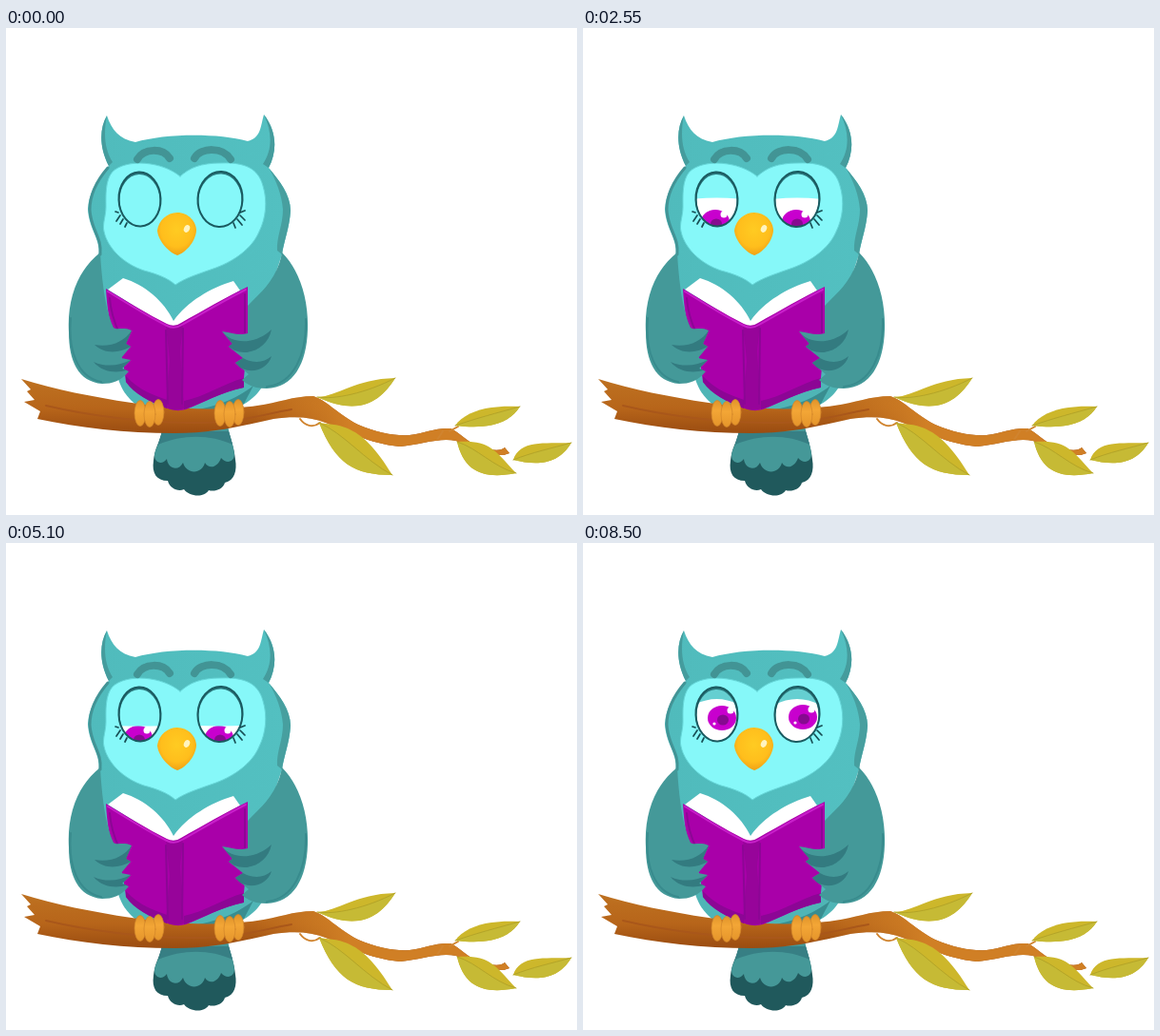
An HTML page that plays this animation: 600 by 512 pixels, repeating every 9.35 s.

```html
<!DOCTYPE html>
<html lang="en">
<head>
<meta charset="utf-8">
<title>Owl reading on a branch</title>
<style>
html, body { margin: 0; width: 100%; height: 100%; overflow: hidden; background: #fff; }
svg { display: block; width: 600px; height: 512px; }
</style>
</head>
<body>
<svg viewBox="0 0 600 512" fill="none" stroke-linecap="round" stroke-linejoin="round">
  <defs>
    <linearGradient id="coat" x1="86" x2="299" y1="0" y2="0" gradientUnits="userSpaceOnUse">
      <stop offset="0" stop-color="#50bbbc"/><stop offset="1" stop-color="#53c0c1"/>
    </linearGradient>
    <linearGradient id="wood" x1="0" x2="0" y1="372" y2="428" gradientUnits="userSpaceOnUse">
      <stop offset="0" stop-color="#bd7020"/><stop offset=".5" stop-color="#b7651a"/><stop offset="1" stop-color="#984a10"/>
    </linearGradient>
    <linearGradient id="twig" x1="260" x2="360" y1="0" y2="0" gradientUnits="userSpaceOnUse">
      <stop offset="0" stop-color="#d07f25" stop-opacity="0"/><stop offset="1" stop-color="#d07f25"/>
    </linearGradient>
    <radialGradient id="gold" cx=".5" cy=".4" r=".62">
      <stop offset="0" stop-color="#ffcb22"/><stop offset=".65" stop-color="#ffbe1c"/><stop offset="1" stop-color="#ee9e14"/>
    </radialGradient>
    <linearGradient id="toe" x1="0" x2="0" y1="0" y2="1">
      <stop offset="0" stop-color="#e0942a"/><stop offset=".4" stop-color="#f3a636"/><stop offset="1" stop-color="#e5952b"/>
    </linearGradient>
  </defs>

  <!-- tail -->
  <path fill="#20595c" d="M164 424C161 436 156 443 155 455C153 468 158 476 170 476C172 484 181 488 187 485C192 492 207 495 213 486C219 488 228 485 230 478C240 476 243 465 241 454C240 442 236 432 233 420Z"/>
  <path fill="#459898" d="M164 424C161 438 157 442 156 449C156 457 164 460 169 453C170 463 181 467 186 457C190 470 206 469 209 457C214 465 223 461 226 452C232 459 240 456 240 448C239 438 236 432 233 420Z"/>
  <path fill="#377f84" d="M164 424H234L238 438C215 427 185 427 160 438Z"/>

  <!-- lower body -->
  <path fill="#4fb5b6" d="M116 360C119 380 130 395 152 405H228C252 397 264 388 272 372V300H116Z"/>
  <path fill="#398d90" d="M178 404C215 402 243 390 260 376L250 395L228 405Z"/>

  <!-- branch -->
  <path id="bough" fill="url(#wood)" d="M16 369C52 380 91 388 132 394C180 402 230 402 264 397C286 394 302 387 323 387C336 391 349 406 370 417C391 426 409 429 424 428C440 426 452 420 467 421C478 426 485 436 499 441C511 444 520 445 524 441L529 447L523 449C506 449 490 442 473 434C456 430 435 438 414 440C381 437 360 424 336 415C321 409 303 408 281 411C252 417 222 426 177 426C125 426 77 420 33 411L36 403L19 393L30 391L22 382L26 380Z"/>
  <use href="#bough" style="fill:url(#twig)"/>
  <path fill="url(#twig)" d="M16 369C52 380 91 388 132 394C180 402 230 402 264 397C286 394 302 387 323 387C336 391 349 406 370 417C391 426 409 429 424 428C440 426 452 420 467 421C478 426 485 436 499 441C511 444 520 445 524 441L529 447L523 449C506 449 490 442 473 434C456 430 435 438 414 440C381 437 360 424 336 415C321 409 303 408 281 411C252 417 222 426 177 426C125 426 77 420 33 411L36 403L19 393L30 391L22 382L26 380Z"/>
  <path stroke="#a9571a" stroke-width="2" d="M42 397C85 407 135 414 190 415S265 407 300 401"/>
  <path stroke="#d0842f" stroke-width="2" d="M309 411C314 418 322 421 330 415M459 424L453 433M466 424L475 419"/>
  <g id="leaves"></g>

  <!-- head and upper body -->
  <path fill="url(#coat)" d="M106 92C98 106 98 126 108 145C96 158 87 174 86 190C87 213 101 222 97 242L100 330H260L290 238C292 224 298 210 299 192C299 175 287 160 276 147C285 130 285 109 271 91C267 105 268 115 254 119C222 110 166 111 136 120C119 117 111 107 106 92Z"/>
  <path fill="#459c9d" d="M106 92C98 106 98 126 108 145L112 141C104 128 102 112 106 92ZM271 91C285 109 285 130 276 147L270 143C280 128 280 110 271 91Z"/>
  <path fill="#479f9f" d="M276 147C287 160 299 175 299 192C298 210 292 224 290 238L285 234C284 220 291 207 291 191C290 176 284 160 276 147Z"/>
  <path stroke="#429496" stroke-width="3" d="M107 147C95 161 88 176 88 191C89 212 101 220 99 238"/>

  <!-- face -->
  <path fill="#86f8f9" stroke="#66d6d8" d="M183 156C164 140 127 137 112 151C104 160 105 177 105 188C105 198 101 206 103 214C107 232 124 248 145 255C160 259 170 263 178 270C188 263 201 259 215 254C240 246 259 231 266 214C273 200 275 182 270 166C265 147 250 141 226 142C204 142 193 147 183 156Z"/>
  <path stroke="#429495" stroke-width="8" d="M138 138C145 126 165 126 172 137M198 137C205 125 228 125 236 138"/>

  <g id="eyes"></g>

  <!-- beak -->
  <path fill="url(#gold)" d="M180 194C192 194 200 204 200 213C199 226 187 237 180 239C171 236 160 224 159 213C160 203 169 194 180 194Z"/>
  <ellipse cx="190" cy="211" rx="3" ry="4" fill="#fff4c0" transform="rotate(25 190 211)"/>

  <!-- book -->
  <path fill="#fff" d="M107 275L123 263C146 270 166 287 176 308C190 288 215 273 239 266L246 276L180 314H170Z"/>
  <path fill="#a900a9" d="M105 274C128 288 149 301 169 311Q177 315 184 310C207 297 231 283 254 272V326L249 378C228 382 205 395 189 401Q178 404 167 399C152 393 137 386 126 372L123 350C116 332 107 313 105 274Z"/>
  <path fill="#97049a" d="M168 312Q177 316 186 310L183 340L187 400Q178 404 168 399L172 350Z"/>
  <path fill="#8c0695" d="M126 366C140 381 155 386 169 391V400C151 393 135 385 126 372ZM187 392C208 388 228 374 250 368V378C228 382 205 395 187 401Z"/>
  <path stroke="#c81fca" stroke-width="2" d="M107 277C130 291 150 304 169 313Q177 317 185 312C208 299 230 286 252 275"/>
  <path stroke="#8c0695" stroke-width="2" d="M109 284C110 298 114 310 119 321M251 280V320M168 318L170 395M186 316L185 395"/>

  <!-- wings -->
  <g fill="#449999">
    <path d="M99 236C76 254 64 284 66 320C66 350 76 372 101 374C112 374 121 371 129 361L122 358L131 349L121 347L131 335L126 332L132 318C124 314 116 318 113 315C106 300 101 274 99 236Z"/>
    <path d="M290 236C309 255 318 286 317 317C316 353 302 378 274 379C263 379 254 376 248 370L255 364L241 352L249 347L234 335L238 332L227 319C236 320 245 324 254 321V292C264 281 285 266 290 236Z"/>
  </g>
  <g fill="#337b80">
    <path d="M132 318C124 330 110 336 93 333C103 343 119 342 131 335L126 332Z"/>
    <path d="M131 349C120 355 105 357 92 351C101 362 115 363 127 360L122 358Z"/>
    <path d="M227 319C238 333 262 333 279 317C275 337 255 345 240 339L234 335L238 332Z"/>
    <path d="M249 347C260 353 271 352 279 345C275 359 258 364 246 357L241 352Z"/>
  </g>
  <path stroke="#388b8d" stroke-width="2" d="M68 305C65 339 75 367 100 372M315 306C316 342 303 374 274 377"/>

  <g id="feet"></g>
</svg>
<script>
const STEP = 850;
const FACE = "#86f8f9";
const $ = id => document.getElementById(id);

// base, handles to the tip, tip, handles back to the base, midrib handles
const leaves = [
  ["327 388", "350 387 366 369", "409 368", "394 392 372 409", "345 391 378 384"],
  ["329 415", "349 418 373 414", "406 470", "366 470 346 458", "355 426 376 454"],
  ["472 418", "483 402 510 396", "540 398", "528 417 505 422", "495 410 515 405"],
  ["474 435", "510 433 514 445", "536 468", "505 474 482 469", "496 442 511 461"],
  ["533 454", "540 433 565 437", "594 436", "580 460 557 460", "553 446 573 442"]
];
$("leaves").innerHTML = leaves.map(([base, up, tip, low, rib]) =>
  `<path fill="#cdb72b" d="M${base}C${up} ${tip}C${low} ${base}"/>
   <path fill="#c6ba35" d="M${tip}C${low} ${base}C${rib} ${tip}"/>
   <path stroke="#b3a428" stroke-width="1" d="M${base}C${rib} ${tip}"/>`).join("");

const toes = [[141, 405], [160, 404], [151, 406], [225, 405], [244, 404], [235, 406]];
$("feet").innerHTML = toes.map(([x, y]) =>
  `<ellipse cx="${x}" cy="${y}" rx="6" ry="13.5" fill="url(#toe)" stroke="#d0842a" stroke-width=".7"/>`).join("");

const eyes = [
  { x: 140.5, y: 180, rx: 22, ry: 28.5, tilt: -2, lashes: "M118 194L115 193M120 197L116 203M123 201L120 206M127 205L125 209" },
  { x: 225, y: 180, rx: 23.5, ry: 29, tilt: 3, lashes: "M246 194L251 192M246 197L251 202M243 201L248 207M239 205L241 210" }
];
$("eyes").innerHTML = eyes.map((e, i) => {
  const oval = dy => `cx="${e.x}" cy="${e.y + dy}" rx="${e.rx}" ry="${e.ry}" transform="rotate(${e.tilt} ${e.x} ${e.y})"`;
  return `<clipPath id="hole${i}"><ellipse ${oval(0)}/></clipPath>
  <g clip-path="url(#hole${i})">
    <ellipse ${oval(0)} fill="#fff"/>
    <g id="iris${i}">
      <ellipse rx="15" ry="13" fill="#c800ce"/>
      <ellipse cx="1" cy="2" rx="6" ry="5.5" fill="#860a90"/>
      <circle cx="9" cy="-8" r="3.5" fill="#fff"/>
      <circle cx="-8" cy="6" r="1.6" fill="#fff"/>
    </g>
    <path id="lid${i}"/>
    <ellipse ${oval(1.5)} stroke="#2a777c" stroke-width="2"/>
  </g>
  <ellipse ${oval(0)} stroke="#1a5a60" stroke-width="2"/>
  <path stroke="#174f55" stroke-width="1.7" d="${e.lashes}"/>`;
}).join("");

// lid edge, its arch, left iris x/y, right iris x/y, lid colour
const poses = {
  shut: [214, 0, 139, 205, 224, 205, FACE],
  slit: [201, 0, 139, 205, 224, 205, FACE],
  low: [192, 1, 139, 205, 224, 205, FACE],
  half: [180, -3, 139, 204, 224, 204, FACE],
  wide: [174, -10, 139, 201, 225, 201, FACE],
  more: [170, -12, 138, 197, 225, 197, FACE],
  open: [172, -16, 146, 184, 231, 183, "#65cfd1"]
};
const order = "shut slit low half shut slit low half wide more open".split(" ");

function pose([lid, arch, lx, ly, rx, ry, colour]) {
  eyes.forEach((e, i) => {
    const a = e.x - 27, b = e.x + 27;
    $("iris" + i).setAttribute("transform", `translate(${i ? rx : lx} ${i ? ry : ly})`);
    $("lid" + i).setAttribute("d", `M${a} 146H${b}V${lid}Q${e.x} ${lid + arch} ${a} ${lid}Z`);
    $("lid" + i).setAttribute("fill", colour);
  });
}

// twig tint shares the branch outline
document.querySelector("use").remove();

const start = performance.now();
let shown = -1;
function draw(now) {
  const i = Math.floor(Math.max(0, now - start) / STEP) % order.length;
  if (i !== shown) pose(poses[order[shown = i]]);
  requestAnimationFrame(draw);
}
draw(start);
</script>
</body>
</html>
```
